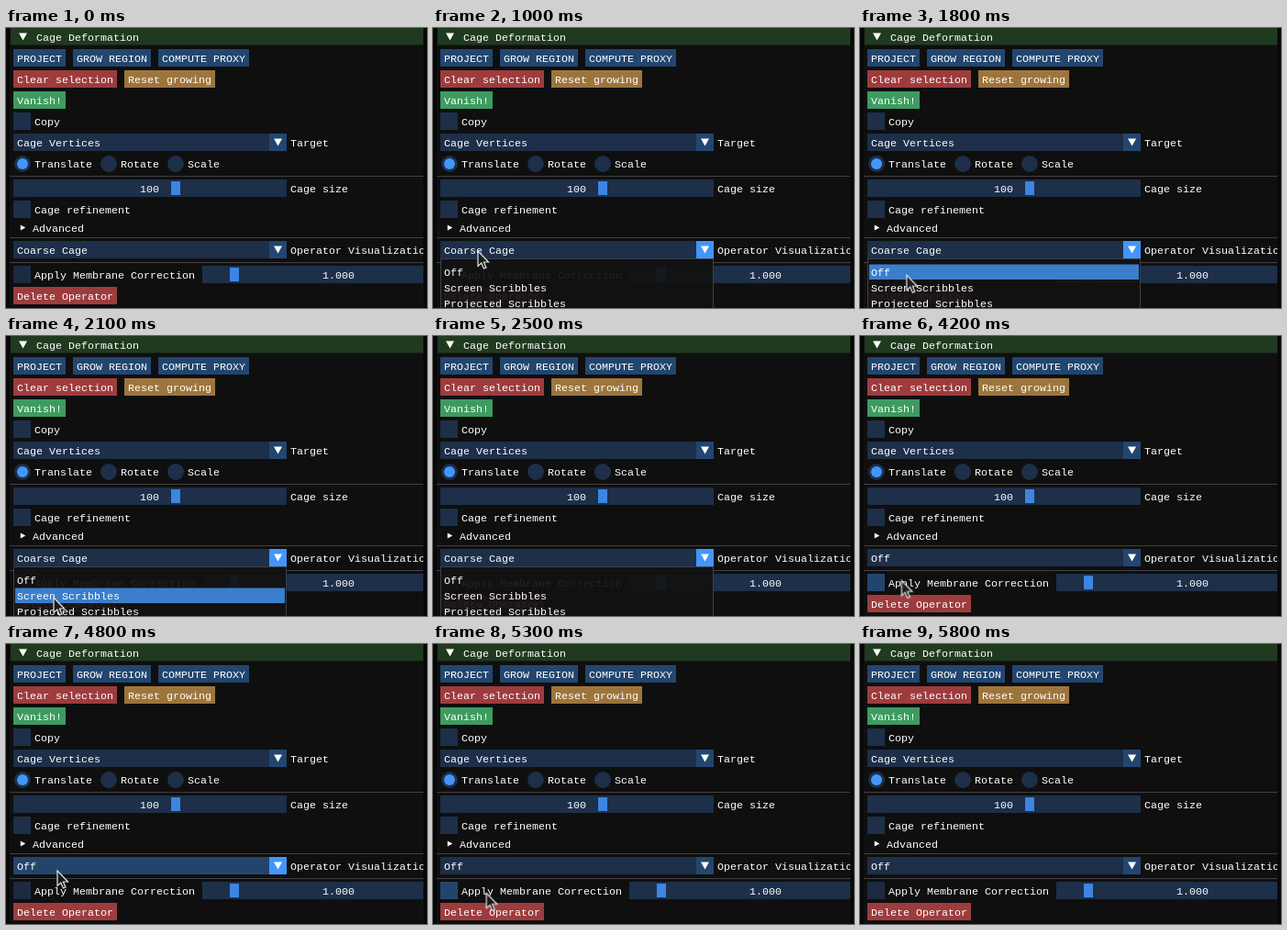
Animation of 459 by 305 pixels, one loop 7.2 s. Source, as an HTML page:

```html
<!DOCTYPE html>
<html lang="en">
<head>
<meta charset="utf-8">
<title>Cage Deformation panel</title>
<style>
  html, body { margin: 0; width: 100%; height: 100%; overflow: hidden; background: #080808; }
  svg { display: block; width: 100vw; height: 100vh; }
  text { font: 11.667px "Liberation Mono", "DejaVu Sans Mono", monospace; fill: #fff; white-space: pre; }

  .frame { fill: #1d2f49; }
  .btn { fill: #22466f; }
  .red { fill: #9e3c3d; }
  .amber { fill: #9d753c; }
  .green { fill: #3d9b60; }
  .grab { fill: #3d85e0; }
  .dot { fill: #4296fa; }
  .tri { fill: #fff; }
  .sep { stroke: #404047; }

  .combo, .arrow, .coarse, .off, .popup, .pick, .check, .delete, .cursor { animation: 7.2s step-end infinite; }
  .combo { animation-name: combo; }
  .arrow { animation-name: arrow; }
  .coarse { animation-name: coarse; }
  .off { animation-name: off; }
  .popup { animation-name: popup; }
  .pick { animation-name: pick; fill: #3a7ecc; }
  .check { animation-name: check; }
  .delete { animation-name: delete; }
  .cursor { animation-name: cursor; }

  @keyframes combo {
    0%, 13.88%, 72.22%, 100% { fill: #1d2f49; }
    4.16%, 65.27% { fill: #23456d; }
  }
  @keyframes arrow {
    0%, 56.94%, 72.22%, 100% { fill: #22466f; }
    4.16%, 65.27% { fill: #4296fa; }
  }
  @keyframes coarse {
    0% { visibility: visible; }
    56.94%, 100% { visibility: hidden; }
  }
  @keyframes off {
    0% { visibility: hidden; }
    56.94%, 100% { visibility: visible; }
  }
  @keyframes popup {
    0%, 56.94%, 100% { visibility: hidden; }
    13.88% { visibility: visible; }
  }
  /* highlighted row of the open list */
  @keyframes pick {
    0%, 34.72%, 56.94%, 100% { opacity: 0; transform: translateY(0); }
    23.61%, 51.38% { opacity: 1; transform: translateY(0); }
    27.77%, 48.61% { opacity: 1; transform: translateY(17px); }
    31.94%, 47.22% { opacity: 1; transform: translateY(34px); }
  }
  @keyframes check {
    0%, 63.88%, 76.38%, 100% { fill: #1b2a40; }
    58.33%, 73.61% { fill: #23456d; }
  }
  @keyframes delete {
    0%, 80.55%, 100% { fill: #9e3c3d; }
    77.77% { fill: #b34647; }
  }
  @keyframes cursor {
    0% { transform: translate(60px, 312px); }
    2.77% { transform: translate(61px, 262px); animation-timing-function: steps(4, start); }
    8.33% { transform: translate(49px, 243px); }
    19.44% { transform: translate(49px, 243px); animation-timing-function: steps(8, start); }
    30.55% { transform: translate(52px, 285px); animation-timing-function: steps(4, start); }
    36.11% { transform: translate(56px, 310px); }
    45.83% { transform: translate(56px, 310px); animation-timing-function: steps(4, start); }
    51.38% { transform: translate(44px, 267px); animation-timing-function: steps(1, start); }
    52.77% { transform: translate(44px, 265px); }
    56.94% { transform: translate(44px, 265px); animation-timing-function: steps(3, start); }
    61.11% { transform: translate(46px, 267px); }
    62.5% { transform: translate(46px, 267px); animation-timing-function: steps(4, start); }
    68.05% { transform: translate(56px, 247px); }
    70.83% { transform: translate(56px, 247px); animation-timing-function: steps(8, start); }
    81.94%, 100% { transform: translate(62px, 312px); }
  }
</style>
</head>
<body>
<svg viewBox="0 0 459 305">
  <defs>
    <clipPath id="panel"><rect x="4" width="451" height="305"/></clipPath>
    <path id="down" class="tri" d="M-4.5-3.9h9L0 3.9z"/>
  </defs>

  <g clip-path="url(#panel)">
    <rect x="4" width="451" height="305" fill="#0f0f0f"/>

    <rect x="5" width="450" height="18.5" fill="#203a20"/>
    <use href="#down" x="18.5" y="9.5"/>
    <text x="33" y="14">Cage Deformation</text>

    <rect class="btn" x="8" y="23" width="57" height="19"/>
    <text x="12" y="37">PROJECT</text>
    <rect class="btn" x="73" y="23" width="85" height="19"/>
    <text x="77" y="37">GROW REGION</text>
    <rect class="btn" x="166" y="23" width="99" height="19"/>
    <text x="170" y="37">COMPUTE PROXY</text>

    <rect class="red" x="8" y="46" width="113" height="19"/>
    <text x="12" y="60">Clear selection</text>
    <rect class="amber" x="129" y="46" width="99" height="19"/>
    <text x="133" y="60">Reset growing</text>

    <rect class="green" x="8" y="69" width="57" height="19"/>
    <text x="12" y="83">Vanish!</text>

    <rect class="frame" x="8" y="92" width="19" height="19"/>
    <text x="31" y="106">Copy</text>

    <rect class="frame" x="8" y="115" width="298" height="19"/>
    <rect class="btn" x="287" y="115" width="19" height="19"/>
    <use href="#down" x="296.5" y="124.5"/>
    <text x="12" y="129">Cage Vertices</text>
    <text x="310" y="129">Target</text>

    <circle class="frame" cx="18" cy="148" r="9"/>
    <circle class="dot" cx="18" cy="148" r="6"/>
    <text x="31" y="152">Translate</text>
    <circle class="frame" cx="112" cy="148" r="9"/>
    <text x="125" y="152">Rotate</text>
    <circle class="frame" cx="185" cy="148" r="9"/>
    <text x="198" y="152">Scale</text>

    <path class="sep" d="M4 161.5H455M4 228.5H455M4 255.5H455"/>

    <rect class="frame" x="8" y="165" width="298" height="19"/>
    <rect class="grab" x="180" y="167" width="10" height="15"/>
    <text x="146" y="179">100</text>
    <text x="310" y="179">Cage size</text>

    <rect class="frame" x="8" y="188" width="19" height="19"/>
    <text x="31" y="202">Cage refinement</text>

    <path class="tri" d="M15.8 214.4l5.5 3.1-5.5 3.1z"/>
    <text x="29" y="222">Advanced</text>

    <rect class="frame combo" x="8" y="232" width="298" height="19"/>
    <rect class="btn arrow" x="287" y="232" width="19" height="19"/>
    <use href="#down" x="296.5" y="241.5"/>
    <text class="coarse" x="12" y="246">Coarse Cage</text>
    <text class="off" x="12" y="246">Off</text>
    <text x="310" y="246">Operator Visualization</text>

    <rect class="check" x="8" y="259" width="19" height="19"/>
    <text x="31" y="273">Apply Membrane Correction</text>
    <rect class="frame" x="214" y="259" width="241" height="19"/>
    <rect class="grab" x="244" y="261" width="10" height="15"/>
    <text x="345" y="273">1.000</text>

    <rect class="delete" x="8" y="282" width="113" height="19"/>
    <text x="12" y="296">Delete Operator</text>

    <g class="popup">
      <rect x="8.5" y="251.5" width="297" height="60" fill="#121212" fill-opacity=".93" stroke="#3f3f48"/>
      <rect class="pick" x="10" y="257.5" width="294" height="16.5"/>
      <text x="12" y="270">Off</text>
      <text x="12" y="287">Screen Scribbles</text>
      <text x="12" y="304">Projected Scribbles</text>
    </g>
  </g>

  <g class="cursor">
    <path d="M0 0V16.5L3.8 13 6.4 19 9 17.9 6.4 12H11.6Z" fill="#1c1c1c" stroke="#e4e4e4" stroke-width="1.2"/>
  </g>
</svg>
</body>
</html>
```
